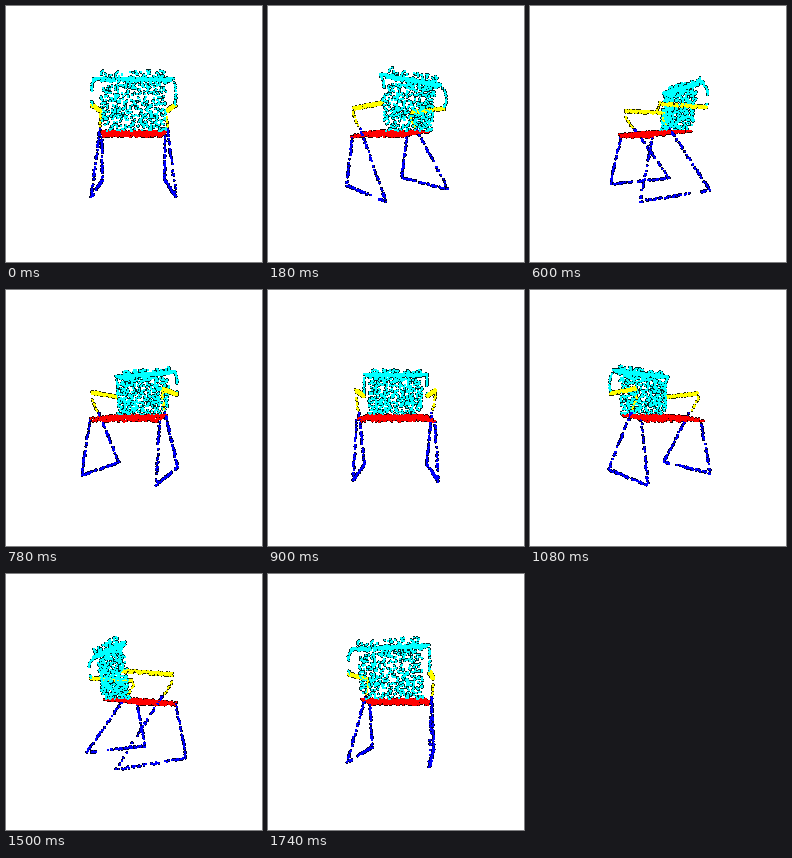
A matplotlib script for the animation above (1.8 s loop, 256 px wide and 256 px high).

```python
import numpy as np
import matplotlib.pyplot as plt
from matplotlib.animation import FuncAnimation

SIZE, DPI = 256, 100
FRAMES, INTERVAL = 30, 60
CENTER_X, CENTER_Y, CAMERA = 127.6, 128, 236
CYAN, RED, YELLOW, BLUE = (0, 1, 1), (1, 0, 0), (1, 1, 0), (0, 0, 1)

rng = np.random.default_rng(7)
parts, tints = [], []


def add(points, color):
    parts.append(points)
    tints.append(np.tile(color, (len(points), 1)))


def tube(path, n, radius):
    """Random points around a polyline of (x, y, z) nodes."""
    path = np.array(path, float)
    steps = np.linalg.norm(np.diff(path, axis=0), axis=1)
    dist = np.concatenate([[0], np.cumsum(steps)])
    at = rng.uniform(0, dist[-1], n)
    line = np.stack([np.interp(at, dist, path[:, k]) for k in range(3)], axis=1)
    off = rng.normal(size=(n, 3))
    return line + radius * off / np.linalg.norm(off, axis=1, keepdims=True)


def seat(n):
    t = rng.uniform(0, 1, n)
    x = rng.uniform(-1, 1, n) * (30 + 4.5 * t)
    y = 2.4 - 4.6 * t ** 1.6 + rng.uniform(-1, 1, n) * (0.6 + 1.1 * t)
    return np.stack([x, y, 20 - 50 * t], axis=1)


def backrest(n):
    u = rng.uniform(0, 1, n)
    x = rng.uniform(-29.5, 29.5, n)
    z = 20 + 5 * np.sqrt(u) + 7 * u ** 4 + rng.uniform(-1, 1, n)
    return np.stack([x, 2.5 + 52.5 * u, z], axis=1)


add(seat(520), RED)
add(backrest(540), CYAN)
add(tube([(-35, 48, 28), (35, 48, 28)], 260, 1.4), CYAN)
for side in (-1, 1):
    add(tube([(side * 35, 48, 28), (side * 36, 42, 33),
              (side * 36, 32, 34.5), (side * 36, 25, 31)], 18, 0.5), CYAN)
    add(tube([(side * 36, 25, 31), (side * 36, 25, -19)], 115, 1.4), YELLOW)
    add(tube([(side * 36, 25, -19), (side * 36, 20, -21),
              (side * 35.5, 6, -11)], 11, 0.5), YELLOW)
    add(tube([(side * 35, 5, -9), (side * 36, -53.3, 36.8)], 44, 0.7), BLUE)
    add(tube([(side * 36, -53.3, 36.8), (side * 36, -53.3, -36.8)], 44, 0.7), BLUE)
    add(tube([(side * 36, -53.3, -36.8), (side * 35, -2, -25)], 34, 0.7), BLUE)

cloud, colors = np.concatenate(parts), np.concatenate(tints)

fig = plt.figure(figsize=(SIZE / DPI, SIZE / DPI), dpi=DPI, facecolor="white")
ax = fig.add_axes([0, 0, 1, 1])
ax.set(xlim=(0, SIZE), ylim=(SIZE, 0))
ax.axis("off")


def dots(pixels, color):
    size = (pixels * 72 / DPI) ** 2
    return ax.scatter(cloud[:, 0], cloud[:, 1], s=size, c=color,
                      linewidths=0, antialiased=False)


# dark rims lie behind all cores, so dense areas look solid
rims = dots(1.9, colors * 0.15)
cores = dots(1.0, colors)


def update(i):
    a = 2 * np.pi * i / FRAMES
    x, y, z = cloud.T
    depth = z * np.cos(a) - x * np.sin(a)
    scale = CAMERA / (CAMERA - depth)
    screen = np.stack([CENTER_X + scale * (x * np.cos(a) + z * np.sin(a)),
                       CENTER_Y - scale * y], axis=1)
    order = np.argsort(depth)
    for layer, shade in ((rims, 0.15), (cores, 1)):
        layer.set_offsets(screen[order])
        layer.set_facecolors(colors[order] * shade)
    return rims, cores


anim = FuncAnimation(fig, update, frames=FRAMES, interval=INTERVAL,
                     repeat=True, repeat_delay=0)
plt.show()
```
